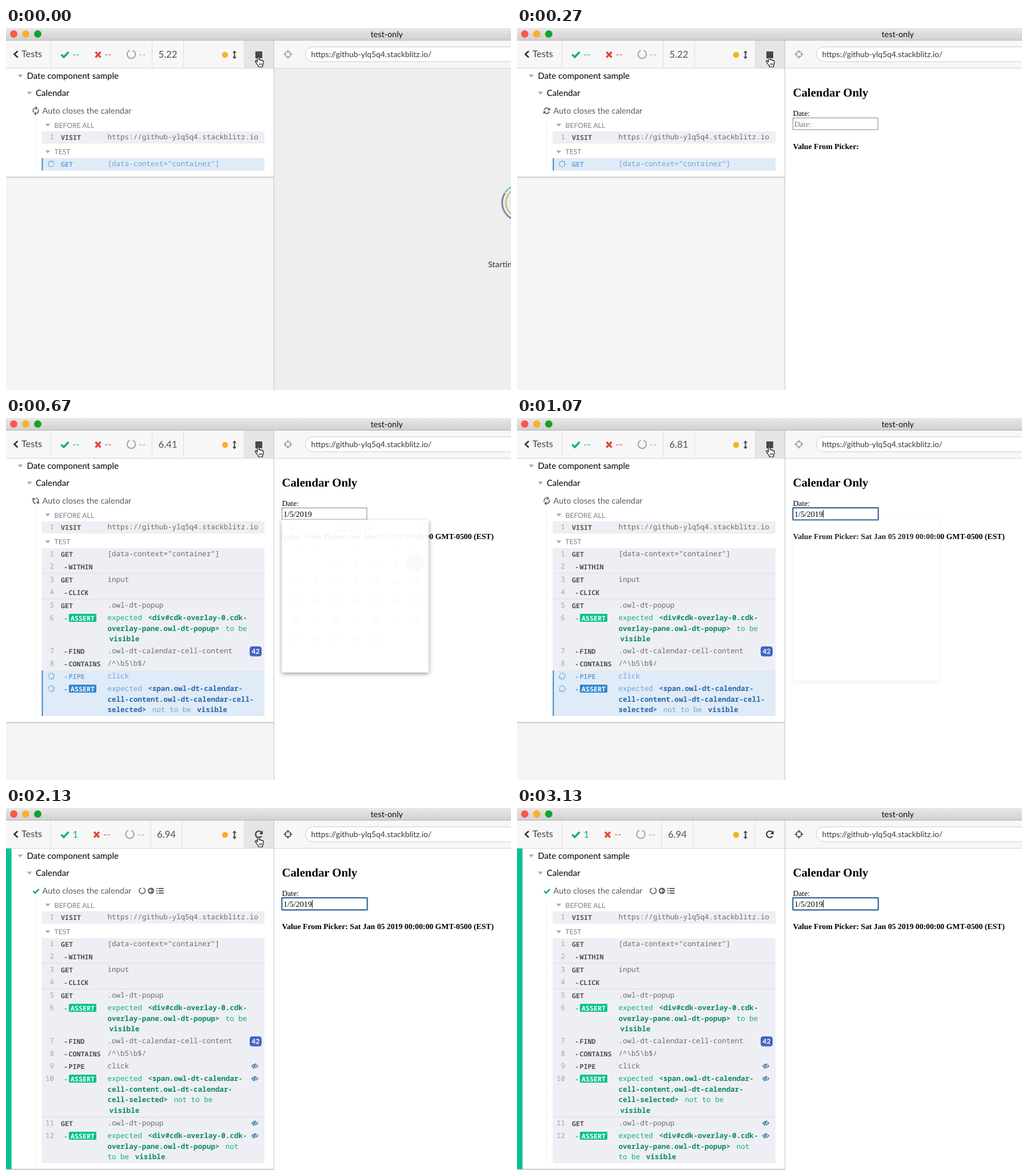
An HTML page that plays this animation: 883 px wide and 634 px high, repeating every 3190 ms.

```html
<!DOCTYPE html>
<html>
<head>
<meta charset="utf-8">
<style>
html, body { margin: 0; width: 100%; height: 100%; overflow: hidden; background: #fff }
svg { display: block }
text { white-space: pre; font-family: Lato, sans-serif; text-rendering: geometricPrecision }
.mono { font-family: "Noto Sans Mono", monospace; font-size: 12.56px }
.name { font-family: "Noto Sans Mono", monospace; font-size: 11.67px; font-weight: 600 }
.serif { font-family: "Liberation Serif", "Times New Roman", serif }
.b { font-weight: 600 }
</style>
</head>
<body>
<svg id="stage" width="883" height="634" viewBox="0 0 883 634"></svg>
<script>
const LOOP = 3190, STEP = 200 / 3;
const GREEN = '#08c18d', INK = '#5c5c5c', BLUE = '#6ba4d9';
const stage = document.getElementById('stage');

const esc = s => s.replace(/</g, '&lt;');
const rect = (x, y, w, h, fill, more = '') =>
  `<rect x="${x}" y="${y}" width="${w}" height="${h}" fill="${fill}" ${more}/>`;
const dot = (x, y, r, fill, more = '') => `<circle cx="${x}" cy="${y}" r="${r}" fill="${fill}" ${more}/>`;
const line = (d, color, width = 1, more = '') =>
  `<path d="${d}" fill="none" stroke="${color}" stroke-width="${width}" ${more}/>`;
const shape = (d, fill, more = '') => `<path d="${d}" fill="${fill}" ${more}/>`;
const label = (x, y, s, size, fill, more = '') =>
  `<text x="${x}" y="${y}" font-size="${size}" fill="${fill}" ${more}>${s}</text>`;
const code = (x, y, s, fill, cls = 'mono', more = '') =>
  `<text x="${x}" y="${y}" fill="${fill}" class="${cls}" ${more}>${s}</text>`;
const group = (s, more) => `<g ${more}>${s}</g>`;
const caret = (x, y) => shape(`M${x - 4.5} ${y - 2.5}h9l-4.5 5z`, '#aaa');

function bezier(x1, y1, x2, y2, p) {
  p = Math.min(1, Math.max(0, p));
  const at = (a, b, s) => 3 * s * (1 - s) ** 2 * a + 3 * s * s * (1 - s) * b + s ** 3;
  let lo = 0, hi = 1;
  for (let k = 0; k < 24; k++) {
    const mid = (lo + hi) / 2;
    if (at(x1, x2, mid) < p) lo = mid; else hi = mid;
  }
  return at(y1, y2, lo);
}

function spinner(y, t) {
  let s = '';
  for (let k = 0; k < 8; k++) {
    const a = k * Math.PI / 4;
    s += dot(5 * Math.cos(a), 5 * Math.sin(a), 1.3, '#4a90cf', `opacity="${0.5 + k / 16}"`);
  }
  return group(s, `transform="translate(79 ${y}) rotate(${t * 0.18})"`);
}

function hiddenEye(y) {
  const blue = '#34719f';
  return group(line('M-5.5 0Q0 -6.4 5.5 0Q0 6.4 -5.5 0Z', blue, 1.2) + dot(0, 0, 2.2, blue) +
    line('M2.8 -4.5L-1.6 5', '#eeeff5', 1.2) + line('M1.8 -4.8L-2.6 4.6', blue, 1.3),
    `transform="translate(435 ${y})"`);
}

// One log row; y is the text centre.
function command(y, num, name, msg, t, pending) {
  const color = pending ? BLUE : '#505050';
  let s = pending ? spinner(y, t) : code(84, y + 4, num, '#a4a4a8', 'mono', 'text-anchor="end"');
  if (name === 'ASSERT') {
    s += code(101, y + 5, '-', pending ? '#3386cc' : GREEN, 'name') +
      rect(110, y - 7, 48, 14, pending ? '#3386cc' : GREEN, 'rx="1.5"') +
      code(113, y + 5, name, '#fff', 'name');
  } else if (name[0] === '-') {
    s += code(101, y + 5, '-', color, 'name') + code(109.5, y + 5, name.slice(1), color, 'name');
  } else s += code(96, y + 5, name, color, 'name');
  const dark = pending ? '#2768a8' : '#0c8a62';
  const body = name === 'ASSERT' ? (pending ? BLUE : '#12ae7e') : pending ? BLUE : '#6c6c6c';
  // {..} is strong text with padding, ~..} continues it from the line above.
  msg.forEach((m, k) => {
    let text = esc(m);
    if (name === 'ASSERT') text = text
      .replace(/\}(.+?)(?=\{|$)/, '}<tspan dx="3">$1</tspan>')
      .replace(/~([^}]*)\}/, `<tspan class="b" fill="${dark}">$1</tspan>`)
      .replace(/\{([^}]*)\}/, `<tspan class="b" dx="3" fill="${dark}">$1</tspan>`);
    s += code(177.5, y + 4 + k * 18.6, text, body);
  });
  return s;
}

const popupAssert = ['expected {<div#cdk-overlay-0.cdk-}', '~overlay-pane.owl-dt-popup>} to be', '{visible}'];

function log(phase, t) {
  const bottom = [249.5, 317, 522, 622][phase], panel = [261, 328, 533, 632.5][phase];
  let s = rect(0, 71, 468, 563, '#f5f5f5') + rect(0, panel, 468, 2, '#000', 'opacity=".08"') +
    rect(0, 71, 468, panel - 71, '#fff') + rect(0, panel - 0.5, 468, 1, '#bbb');
  if (phase === 3) s += rect(0, 71, 9.6, panel - 71, GREEN);
  s += caret(25, 84) + label(36.5, 89, 'Date component sample', 15, '#000') +
    caret(41, 114) + label(52, 119, 'Calendar', 15, '#000') +
    label(63.5, 149.5, 'Auto closes the calendar', 14.5, INK);
  if (phase === 3) s += line('M47.5 145.5l3.5 3.5l6.5 -7', '#16ad7e', 2.6);
  else {
    const half = 'M-4.6 -1.2A4.8 4.8 0 0 1 3.4 -3.4', head = 'M5.8 -5.8v5h-5z';
    const arrow = line(half, INK, 1.7) + shape(head, INK);
    s += group(arrow + group(arrow, 'transform="rotate(180)"'),
      `transform="translate(52 145) rotate(${(t - 267) * 0.18})"`);
  }
  s += line(`M51.5 161V${bottom}`, '#ccc', 1, 'stroke-dasharray="1 2"') +
    caret(73, 170) + label(84.5, 174.5, 'BEFORE ALL', 12.2, '#808080') +
    rect(62.5, 181, 389.5, 21.5, '#eeeff5') +
    command(191, 1, 'VISIT', ['https://github-ylq5q4.stackblitz.io'], t) +
    caret(73, 217) + label(84.5, 221, 'TEST', 12.2, '#808080') +
    rect(62.5, 228, 389.5, bottom - 228, '#eeeff5');
  const busyTop = [228, 295, 442][phase];
  if (busyTop) s += rect(62.5, busyTop, 389.5, bottom - busyTop, '#dfebf7') +
    rect(62.5, busyTop, 2, bottom - busyTop, '#3b8bcb');
  const rule = y => rect(62.5, y, 389.5, 1, '#dcdde3');
  s += command(238, 1, 'GET', ['[data-context="container"]'], t, phase === 0);
  if (phase > 0) s += command(260, 2, '-WITHIN', [], t) + rule(271.5) +
    command(283, 3, 'GET', ['input'], t) + command(305, 4, '-CLICK', [], t, phase === 1);
  if (phase > 1) {
    s += rule(316.5) + command(328, 5, 'GET', ['.owl-dt-popup'], t) +
      command(350, 6, 'ASSERT', popupAssert, t) +
      command(408, 7, '-FIND', ['.owl-dt-calendar-cell-content'], t) +
      rect(426, 400, 21, 17.5, '#4264c4', 'rx="4.5"') +
      label(436.5, 413, '42', 12, '#fff', 'font-weight="700" text-anchor="middle"') +
      command(430, 8, '-CONTAINS', ['/^\\b5\\b$/'], t) +
      command(452, 9, '-PIPE', ['click'], t, phase === 2) +
      command(474, 10, 'ASSERT', phase === 2
        ? ['expected {<span.owl-dt-calendar-}', '~cell-content.owl-dt-calendar-cell-}', '~selected>} not to be {visible}']
        : ['expected {<span.owl-dt-calendar-}', '~cell-content.owl-dt-calendar-}', '~cell-selected>} not to be', '{visible}'],
        t, phase === 2);
  }
  if (phase === 3) s += rule(541) + command(552, 11, 'GET', ['.owl-dt-popup'], t) +
    command(574, 12, 'ASSERT',
      [popupAssert[0], '~overlay-pane.owl-dt-popup>} not', 'to be {visible}'], t) +
    [452, 474, 552, 574].map(hiddenEye).join('');
  return s;
}

function popup(t) {
  const grow = bezier(.25, .8, .25, 1, (t - 452) / 400);
  const leave = Math.max(0, 1 - Math.max(0, t - 982) / 100);
  if (grow <= 0 || leave <= 0) return '';
  const shown = t < 982 ? bezier(.55, 0, .55, .2, (t - 540) / 400) : 0;
  const mid = 'text-anchor="middle"';
  let s = label(125, 22, 'Jan 2019 ▾', 14, '#333', mid) +
    line('M20 12l-5 5l5 5M237 12l5 5l-5 5', '#333', 1.5);
  [...'SMTWTFS'].forEach((d, k) => s += label(25 + k * 34.7, 52, d, 11, '#999', mid));
  s += dot(233, 80, 15.5, '#777');
  for (let d = 1; d <= 31; d++) {
    const cell = d + 1;
    s += label(25 + cell % 7 * 34.7, 84.5 + Math.floor(cell / 7) * 35, d, 12, d === 5 ? '#fff' : '#333', mid);
  }
  return group(rect(0, 0, 256.5, 282, '#fff', 'filter="url(#shade)"') + group(s, `opacity="${shown}"`),
    `transform="translate(482.5 178) scale(1 ${grow})" opacity="${grow * leave}"`);
}

function page(i, t) {
  if (i < 3) {
    const arc = (r, a, b, c) => {
      const p = g => `${899 + r * Math.cos(g * Math.PI / 180)} ${306 + r * Math.sin(g * Math.PI / 180)}`;
      return line(`M${p(a)}A${r} ${r} 0 0 1 ${p(b)}`, c, 3);
    };
    const turn = t * 0.12;
    return rect(469, 71, 414, 563, '#eee') + arc(31.5, 95 + turn, 213 + turn, '#977ba5') +
      arc(31.5, 215 + turn, 300 + turn, '#8fbfd8') + arc(25, 100, 265, '#b9c98a') +
      label(843, 419, 'Starting dev server', 14, INK, 'font-weight="700"');
  }
  const filled = i >= 9, serif = 'class="serif"', bold = serif + ' font-weight="700"';
  let s = rect(469, 71, 414, 563, '#fff') + label(482.5, 120, 'Calendar Only', 20.75, '#000', bold) +
    label(482.5, 154, 'Date:', 13.6, '#000', serif) +
    label(482.5, 211.5, 'Value From Picker:' + (filled ? ' Sat Jan 05 2019 00:00:00 GMT-0500 (EST)' : ''), 13.75, '#000', bold);
  s += i >= 15
    ? rect(482.3, 157.2, 149.4, 21.3, '#fff', 'stroke="#44719f" stroke-width="2.4" rx="1"') + rect(535, 161, 1, 13.5, '#000')
    : rect(482.5, 157.5, 148.5, 20.5, '#fff', 'stroke="#858585"');
  return s + label(485, 172.5, filled ? '1/5/2019' : 'Date:', filled ? 14 : 13.6, filled ? '#000' : '#757575', serif) + popup(t);
}

function toolbar(i, t) {
  const done = i >= 18, hover = i < 41, dx = done ? -2.5 : 0;
  const timer = (i < 6 ? 5.22 : Math.min(6.94, 5.743 + t / 1000)).toFixed(2);
  const dark = '#444', ok = '#16ad7e', bad = '#e5463c';
  let s = rect(0, 0, 883, 22, 'url(#bar)') + rect(0, 21, 883, 1, '#b5b5b5') +
    dot(13.5, 10.5, 6.5, '#f9564f') + dot(34.5, 10.5, 6.5, '#fab02e') + dot(55.5, 10.5, 6.5, '#16a32a') +
    label(637.5, 15.5, 'test-only', 14.4, '#111') +
    rect(0, 22, 883, 48, '#f7f7f7') + (hover ? rect(417, 22, 51, 48, '#e5e5e5') : '') +
    rect(0, 70, 883, 1, '#d2d2d2');
  for (const x of [78, 255 + dx, 310 + dx, 416]) s += rect(x, 22, 1, 48, '#dedede');
  s += line('M20.5 40.5L14.5 46L20.5 51.5', '#333', 2.6) + label(27, 51, 'Tests', 16.2, '#444') +
    line('M96.5 46.5l4.5 4.5l8.5 -9', ok, 3.4) + label(116.5, 52, done ? '1' : '--', 16.5, ok) +
    group(line('M156.5 42l9 9.5M165.5 42l-9 9.5', bad, 3.4) + label(172.5, 52, '--', 16.5, bad) +
      line('M221.5 39.4A7.2 7.2 0 1 1 216.5 39.4', '#a8a8a8', 2) + label(232, 52, '--', 16.5, '#a8a8a8') +
      label(266.5, 51.5, timer, 16.7, '#505050'), `transform="translate(${dx} 0)"`) +
    dot(383, 47, 5.2, '#fab11e') + line('M399.5 42V52', dark, 2) +
    shape('M399.5 39.5l3.5 4h-7zM399.5 54.5l3.5 -4h-7z', dark);
  s += done
    ? line('M446.5 42.5A5.7 5.7 0 1 0 447 49', '#444', 2.3) + shape('M449 39.5v6.5h-6.5z', '#444')
    : rect(436, 41, 12, 12, '#484848');
  const aim = done ? '#444' : '#999';
  s += dot(493, 46, 5, 'none', `stroke="${aim}" stroke-width="1.6"`) +
    line('M493 38.5v5M493 48.5v5M485.5 46h5M495.5 46h5', aim, 1.6) +
    rect(523.5, 33, 390, 26, '#fff', 'rx="13" stroke="#ccc"') +
    label(533.5, 50.5, 'https://github-ylq5q4.stackblitz.io/', 13.9, '#3a3a3a') +
    rect(468, 22, 1, 612, '#c4c4c4');
  if (hover) s += shape('M439.5 60V52.2q0 -1.7 1.4 -1.7t1.4 1.7V56q.4 -.9 1.6 -.6t1.2 1.2q.5 -.8 1.5 -.5t1.1 1.2q.6 -.6 1.4 -.2t.8 1.5V62q0 2 -1.3 3.4V68H441.2V66q-2.2 -1.8 -3.2 -3.9l-2 -2.9q-.8 -1.5 .5 -2t2.2 1.1z',
    '#fff', 'stroke="#111" stroke-width="1.2" stroke-linejoin="round"') +
    line('M443.2 61.5v3.5M445.2 61.5v3.5M447.2 61.5v3.5', '#111', .9);
  return s;
}

function rowTools() {
  return line('M240 139.9A5.3 5.3 0 1 1 236.4 139.9', INK, 1.6) + dot(253.5, 145, 5.5, INK) +
    line('M257 145h-6M253.5 142l-3 3l3 3', '#fff', 1.5) +
    line('M263 141h2M263 145h2M263 149h2M266.5 141h9M266.5 145h9M266.5 149h9', INK, 1.9);
}

const defs = `<defs><linearGradient id="bar" x2="0" y2="1"><stop stop-color="#e8e8e8"/>
  <stop offset="1" stop-color="#d0d0d0"/></linearGradient>
  <filter id="shade" x="-10%" y="-10%" width="120%" height="120%">
  <feDropShadow dx="0" dy="3" stdDeviation="4" flood-opacity=".42"/></filter></defs>`;

let last = -1;
function tick() {
  const i = Math.floor((performance.now() % LOOP + 3.4) / STEP);
  if (i !== last) {
    last = i;
    const t = i * STEP, phase = i < 6 ? 0 : i < 9 ? 1 : i < 18 ? 2 : 3;
    stage.innerHTML = defs + page(i, t) + log(phase, t) + (i >= 25 ? rowTools() : '') + toolbar(i, t);
  }
  requestAnimationFrame(tick);
}
tick();
</script>
</body>
</html>
```
